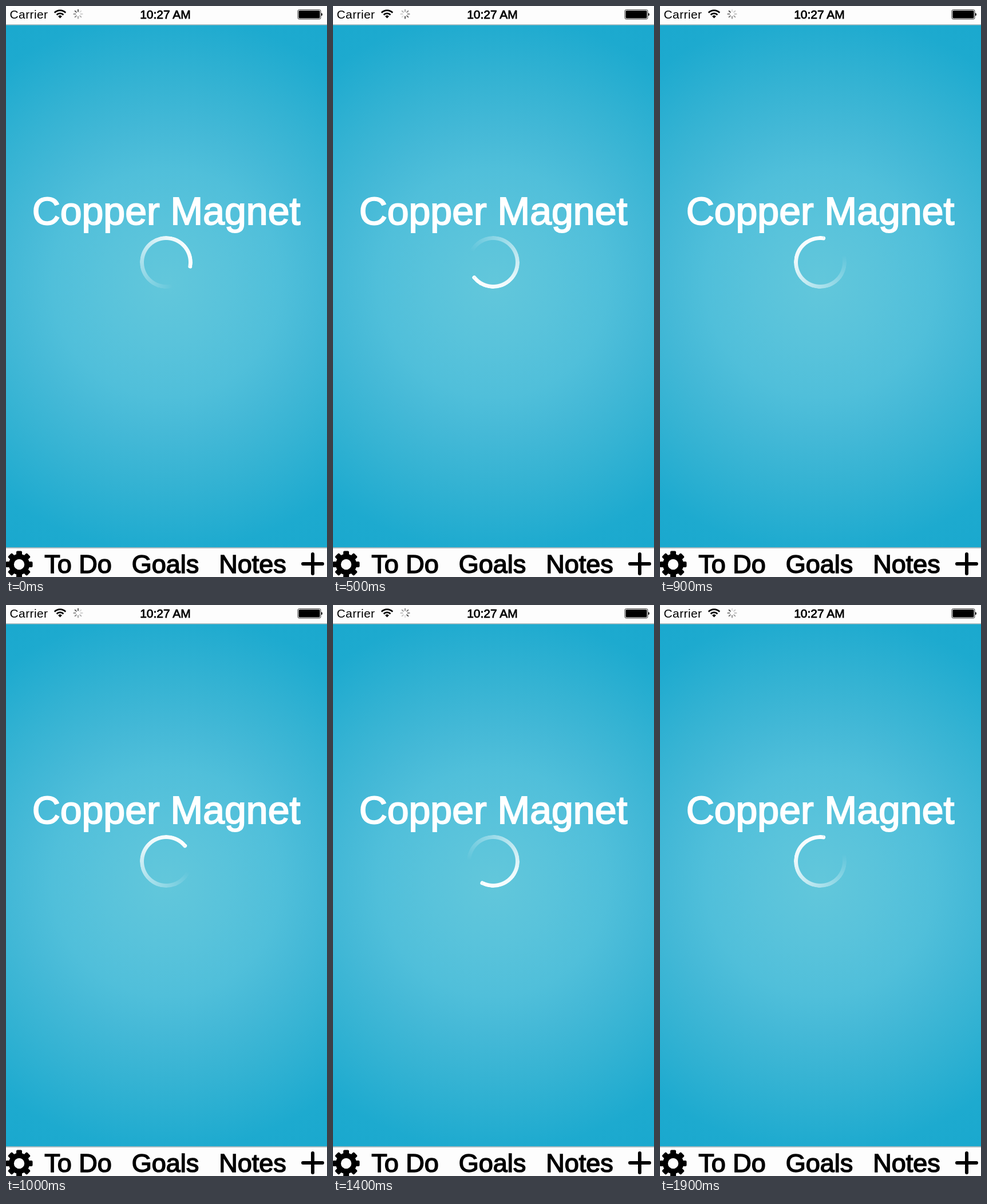
These frames come from a looping animation (561 by 998 pixels, 2 s). An HTML page:

```html
<!DOCTYPE html>
<html lang="en">
<head>
<meta charset="utf-8">
<title>Loading</title>
<style>
  html, body { margin: 0; width: 100%; height: 100%; overflow: hidden; background: #fdfdfd; }
  #stage { position: relative; width: 561px; height: 998px; overflow: hidden; }
  #backdrop {
    position: absolute; left: 0; top: 33px; width: 561px; height: 914px;
    background: radial-gradient(circle at 280px 451px,
      #62c7db 0, #59c3db 110px, #50bfda 200px, #45b9d7 265px,
      #35b3d3 350px, #1daacf 470px, #19a8ce 560px);
  }
  svg { position: absolute; left: 0; top: 0; display: block; }
  text { font-family: "Liberation Sans", Arial, sans-serif; }
  .title { font-size: 68px; fill: #fff; stroke: #fff; stroke-width: 2; text-anchor: middle; }
  .tab { font-size: 45px; stroke: #000; stroke-width: 1.6; text-anchor: middle; }
  .status { font-size: 21px; }
  .carrier { letter-spacing: .4px; }
  .clock { stroke: #000; stroke-width: .8; text-anchor: middle; }
  #spinner { position: absolute; left: 234px; top: 402px; width: 92px; height: 92px; }
  #spinner .tail {
    position: absolute; inset: 0; border-radius: 50%;
    background: conic-gradient(rgba(255,255,255,0) 65deg, rgba(255,255,255,.42) 160deg,
      rgba(255,255,255,.9) 270deg, #fff 360deg);
    -webkit-mask: radial-gradient(circle, transparent 38.5px, #000 39.5px);
    mask: radial-gradient(circle, transparent 38.5px, #000 39.5px);
  }
  /* Right half of the rounded head, just ahead of the tail */
  #spinner .cap {
    position: absolute; left: 46px; top: 0; width: 3.5px; height: 7px;
    border-radius: 0 3.5px 3.5px 0; background: #fff;
  }
</style>
</head>
<body>
<div id="stage">
  <div id="backdrop"></div>
  <svg width="561" height="998" viewBox="0 0 561 998">
    <rect width="561" height="32" fill="#fdfdfd"/>
    <rect y="32" width="561" height="1.5" fill="#b3bdbf"/>
    <rect y="946" width="561" height="2" fill="#a9bbc0"/>
    <rect y="948" width="561" height="50" fill="#fdfdfd"/>

    <text class="status carrier" x="6.5" y="22">Carrier</text>
    <text class="status clock" x="278.5" y="22">10:27 AM</text>
    <g id="wifi" transform="translate(94.5 20.5)" fill="none" stroke="#000" stroke-width="2.7">
      <path d="M0 1L-3.4 -2.6A5 5 0 0 1 3.4 -2.6Z" fill="#000" stroke="none"/>
      <path d="M-5.9 -5A8 8 0 0 1 5.9 -5"/>
      <path d="M-9.7 -8.8A13.5 13.5 0 0 1 9.7 -8.8"/>
    </g>
    <g id="activity" transform="translate(126 14)" stroke="#000" stroke-width="1.7" stroke-linecap="round"></g>
    <rect x="510" y="6.5" width="40" height="16.5" rx="2.5" fill="none" stroke="#333"/>
    <rect x="511.5" y="8" width="37" height="13.5" rx="1.5"/>
    <path d="M551 12Q553 12.5 553 14.7T551 17.5Z"/>

    <text class="title" x="280" y="382">Copper Magnet</text>

    <g id="gear" transform="translate(23 976)">
      <circle r="13.7" fill="none" stroke="#000" stroke-width="9"/>
    </g>
    <text class="tab" x="126" y="991">To Do</text>
    <text class="tab" x="278.5" y="991">Goals</text>
    <text class="tab" x="431" y="991">Notes</text>
    <path d="M519 975H553M536 958V992" stroke="#000" stroke-width="6" stroke-linecap="round"/>
  </svg>
  <div id="spinner"><div class="tail"></div><div class="cap"></div></div>
</div>
<script>
const LOOP = 2000, STEP = 100, SPOKES = 8;

// [time in ms, clockwise degrees of the spinner's head from the top]
const HEAD = [[0, 103], [300, 175], [700, 294], [900, 371], [1200, 499], [1400, 570], [1900, 731]];

const spinner = document.getElementById('spinner');

function addTo(id, tag, attributes) {
  const node = document.createElementNS('http://www.w3.org/2000/svg', tag);
  for (const [name, value] of Object.entries(attributes)) node.setAttribute(name, value);
  return document.getElementById(id).appendChild(node);
}

const spokes = Array.from({ length: SPOKES }, (_, i) => {
  const transform = `rotate(${i * 360 / SPOKES})`;
  addTo('gear', 'rect', { x: -5, y: -23.5, width: 10, height: 9, rx: 2, transform });
  return addTo('activity', 'path', { d: 'M0 -4.3V-7.7', transform });
});

function headAngle(time) {
  const next = Math.max(1, HEAD.findIndex(([at]) => at >= time));
  const [t0, a0] = HEAD[next - 1], [t1, a1] = HEAD[next];
  return a0 + (a1 - a0) * (time - t0) / (t1 - t0);
}

function draw(now) {
  const time = Math.floor(now % LOOP / STEP) * STEP;
  // The rounded cap reaches about 4 degrees past the tail
  spinner.style.transform = `rotate(${headAngle(time) - 4}deg)`;

  const lead = Math.round(time / 1000 * SPOKES);
  spokes.forEach((spoke, i) => {
    const behind = ((lead - i) % SPOKES + SPOKES) % SPOKES;
    spoke.setAttribute('stroke-opacity', 0.75 - 0.6 * behind / (SPOKES - 1));
  });
}

const start = performance.now();
function frame() {
  draw(performance.now() - start);
  requestAnimationFrame(frame);
}
frame();
</script>
</body>
</html>
```
